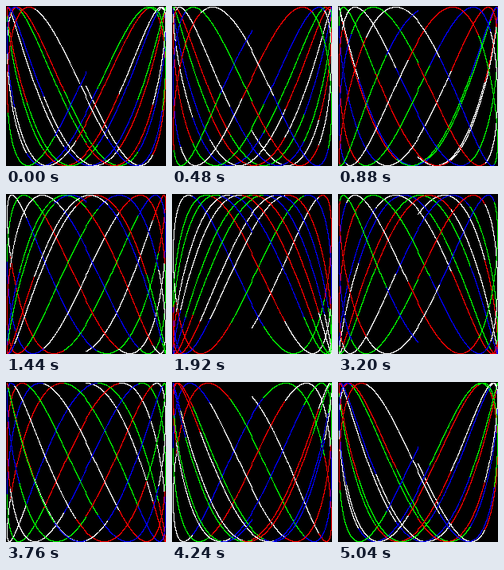
These frames come from a looping animation (201x201 px, 5120 ms). An HTML page with a canvas:

```html
<!DOCTYPE html>
<html>
<head>
<meta charset="utf-8">
<title>Lissajous</title>
<style>
html, body { margin: 0; height: 100%; overflow: hidden; background: #000; }
canvas { display: block; width: 201px; height: 201px; image-rendering: pixelated; }
</style>
</head>
<body>
<canvas id="stage" width="201" height="201"></canvas>
<script>
const RADIUS = 100, SIDE = 2 * RADIUS + 1;
const CYCLES = 5, STEP = 0.001, FREQ = 2.106;
const FRAMES = 64, DELAY = 80, PHASE_STEP = 0.1;
const BLACK = 0xff000000;
const COLORS = [0xffffffff, 0xff0000ff, 0xff00ff00, 0xffff0000]; // ABGR: white, red, green, blue

const ctx = document.getElementById('stage').getContext('2d');
const image = ctx.createImageData(SIDE, SIDE);
const pixels = new Uint32Array(image.data.buffer);
const toPixel = v => RADIUS + Math.trunc(v * RADIUS + 0.5);

function draw(phase) {
  pixels.fill(BLACK);
  for (let t = 0; t < CYCLES * 2 * Math.PI; t += STEP) {
    const x = toPixel(Math.sin(t));
    const y = toPixel(Math.sin(t * FREQ + phase));
    pixels[y * SIDE + x] = COLORS[Math.floor(t) % COLORS.length];
  }
  ctx.putImageData(image, 0, 0);
}

let shown = -1;
function tick() {
  const frame = Math.floor(performance.now() / DELAY) % FRAMES;
  if (frame !== shown) draw(frame * PHASE_STEP);
  shown = frame;
  requestAnimationFrame(tick);
}
tick();
</script>
</body>
</html>
```
